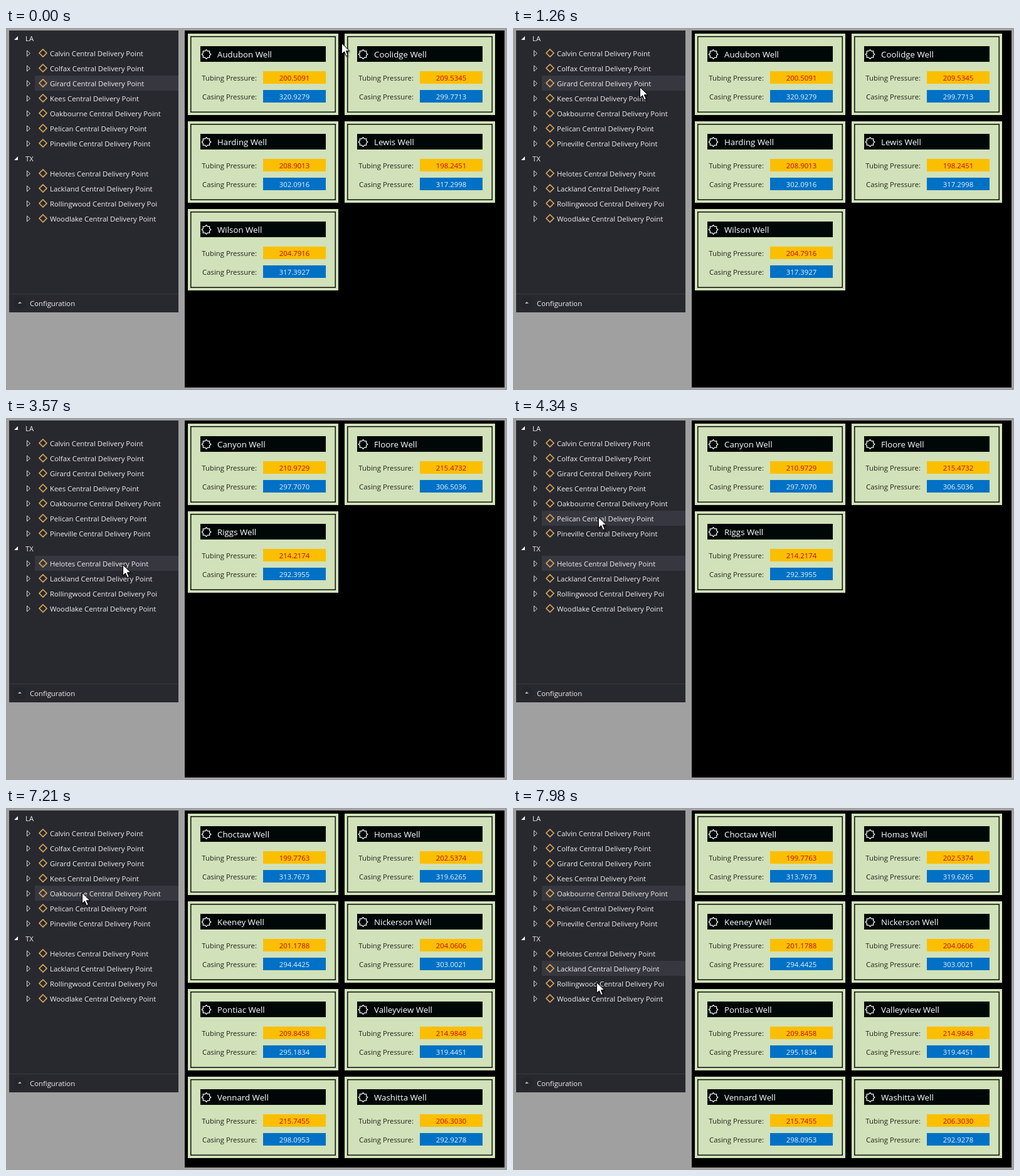
An HTML page that plays this animation: 799 px wide and 578 px high, repeating every 8 s.

```html
<!DOCTYPE html>
<html lang="en">
<head>
<meta charset="utf-8">
<title>Well pressures</title>
<style>
html, body { margin: 0; width: 100%; height: 100%; overflow: hidden; background: #a0a0a0; }
svg { display: block; font: 11.33px "Open Sans", "Noto Sans", sans-serif; }
text { white-space: pre; }
#cursor { filter: drop-shadow(1px 2px 1px rgba(0, 0, 0, .4)); }
</style>
</head>
<body>
<svg id="stage" width="799" height="578" viewBox="0 0 799 578"></svg>
<script>
const LOOP = 8000, STEP = 70, ROW = 24;

// Tree rows with the y of their centre line
const sites = [
  ...["Calvin", "Colfax", "Girard", "Kees", "Oakbourne", "Pelican", "Pineville"].map((name, i) => [name, 40 + i * ROW]),
  ...["Helotes", "Lackland", "Rollingwood", "Woodlake"].map((name, i) => [name, 232 + i * ROW])
];

const scenes = [
  { from: 0, site: "Girard", wells: [
    ["Audubon", "200.5091", "320.9279"], ["Coolidge", "209.5345", "299.7713"],
    ["Harding", "208.9013", "302.0916"], ["Lewis", "198.2451", "317.2998"],
    ["Wilson", "204.7916", "317.3927"]] },
  { from: 3570, site: "Helotes", wells: [
    ["Canyon", "210.9729", "297.7070"], ["Floore", "215.4732", "306.5036"],
    ["Riggs", "214.2174", "292.3955"]] },
  { from: 7210, site: "Oakbourne", wells: [
    ["Choctaw", "199.7763", "313.7673"], ["Homas", "202.5374", "319.6265"],
    ["Keeney", "201.1788", "294.4425"], ["Nickerson", "204.0606", "303.0021"],
    ["Pontiac", "209.8458", "295.1834"], ["Valleyview", "214.9848", "319.4451"],
    ["Vennard", "215.7455", "298.0953"], ["Washitta", "206.3030", "292.9278"]] }
];

const smooth = p => p * p * (3 - 2 * p);
const start = [535, 24];
// Cursor moves: begin, end, destination, easing
const moves = [
  [0, 770, [203, 96], smooth],
  [1190, 1260, [202, 94], smooth],
  [1260, 1890, [186, 234], smooth],
  [3850, 4550, [122, 137], smooth],
  [4620, 4760, [121, 135], smooth],
  [7420, 7980, [133, 278], p => p ** 1.3]
];

const rect = (x, y, w, h, fill, more = "") =>
  `<rect x="${x}" y="${y}" width="${w}" height="${h}" fill="${fill}" ${more}/>`;
const text = (x, y, s, fill = "#f1f1f1", more = "") =>
  `<text x="${x}" y="${y}" fill="${fill}" ${more}>${s}</text>`;
const line = (d, color, width) =>
  `<path d="${d}" fill="none" stroke="${color}" stroke-width="${width}"/>`;

const star = "M" + Array.from({ length: 16 }, (_, i) => {
  const r = i % 2 ? 5.5 : 7.3, a = i * Math.PI / 8;
  return `${(r * Math.cos(a)).toFixed(2)} ${(r * Math.sin(a)).toFixed(2)}`;
}).join("L") + "Z";

function reading(y, label, value, fill, color) {
  return text(110, y + 15, label, "#20241c", 'text-anchor="end"') +
    rect(120, y, 100, 20, fill) +
    text(170, y + 15, value, color, 'text-anchor="middle"');
}

function card([name, tubing, casing], i) {
  return `<g transform="translate(${290 + i % 2 * 250} ${9 + (i >> 1) * 140})">` +
    rect(0, 0, 240, 130, "#d1e1b9") +
    rect(4.75, 4.75, 230.5, 120.5, "none", 'stroke="#0a0f08" stroke-width="1.5"') +
    rect(20, 20, 200, 25, "#000807") +
    `<g transform="translate(29.5 33)">${line(star, "#f1f1f1", 1.3)}</g>` +
    text(47, 38, name + " Well", "#fff", 'font-size="13.3"') +
    reading(60, "Tubing Pressure:", tubing, "#fbbf00", "#c80000") +
    reading(90, "Casing Pressure:", casing, "#0071c5", "#e8f2fa") + "</g>";
}

function region(y, name) {
  return `<path d="M19 ${y - 3}v6h-6z" fill="#f1f1f1"/>` + text(31, y + 5, name);
}

function siteRow([name, y]) {
  const label = name + " Central Delivery " + (name == "Rollingwood" ? "Poi" : "Point");
  return line(`M33.5 ${y - 4}v9l5-4.5z`, "#d8d8d8", 1) +
    line(`M59 ${y - 6}l6 6-6 6-6-6z`, "#d3a75b", 1.7) +
    text(70, y + 5, label);
}

const stage = document.getElementById("stage");
stage.innerHTML =
  rect(5, 4, 270, 450, "#28282f") +
  '<g id="marks"></g>' +
  region(16, "LA") + region(208, "TX") + sites.map(siteRow).join("") +
  rect(5, 424, 270, 1, "#3a3a42") +
  '<circle cx="22" cy="439" r="10" fill="#25262b"/><path d="M19 440l3-3 3 3z" fill="#b8b8b8"/>' +
  text(38, 444, "Configuration") +
  rect(285, 4, 510, 570, "#000") +
  '<g id="cards"></g>' +
  '<path id="cursor" d="M.5.5V17.5l4-3.8 3 7 2.8-1.2-3-6.8H13z" fill="#fff" stroke="#000"/>';
const [marks, cards, cursor] = ["marks", "cards", "cursor"].map(id => document.getElementById(id));

function tip(t) {
  let pos = start;
  for (const [begin, end, to, ease] of moves) {
    if (t <= begin) break;
    const p = ease(Math.min(1, (t - begin) / (end - begin)));
    pos = pos.map((v, i) => v + (to[i] - v) * p);
  }
  return pos;
}

let shown;
function draw() {
  const t = Math.floor(performance.now() % LOOP / STEP) * STEP;
  const scene = scenes.findLast(s => t >= s.from);
  if (scene != shown) cards.innerHTML = scene.wells.map(card).join("");
  shown = scene;

  // The hover mark trails the cursor by one step
  const [hx, hy] = tip(t - STEP);
  marks.innerHTML = sites
    .filter(([name, y]) => name == scene.site || hx > 46 && hx < 275 && hy >= y - 12 && hy < y + 12)
    .map(([, y]) => rect(46, y - 12, 229, ROW, "#37373f")).join("");

  const [x, y] = tip(t).map(Math.round);
  cursor.setAttribute("transform", `translate(${x} ${y})`);
  requestAnimationFrame(draw);
}
draw();
</script>
</body>
</html>
```
